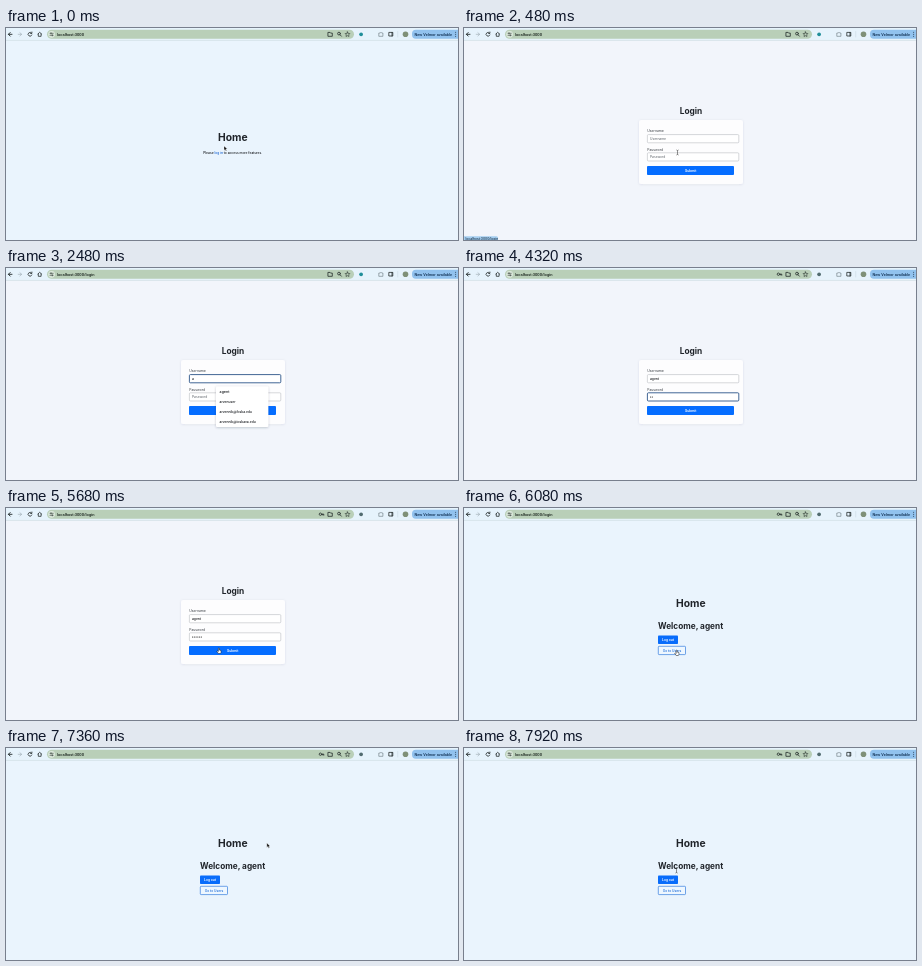
Animation, 452 px wide and 212 px high, one loop 8 s. Source, as an HTML page:

```html
<!DOCTYPE html>
<html lang="en">
<head>
<meta charset="utf-8">
<title>Login flow</title>
<style>
html, body { margin: 0; width: 100%; height: 100%; overflow: hidden; background: #eaf4fd; }
svg { display: block; width: 100vw; height: 100vh; }
text { font-family: Inter, "Open Sans", sans-serif; font-size: 3.3px; font-weight: 500; fill: #15181c; }
.bar text { font-family: Roboto, Inter, sans-serif; font-size: 4.05px; fill: #17211b; }
.h { font-weight: 700; fill: #20242a; }
.mid { text-anchor: middle; }
.label { font-size: 3.4px; font-weight: 400; fill: #3c4147; }
.hint { font-weight: 400; fill: #5c6269; }
.w { fill: #fff; font-weight: 600; }
.icon { fill: none; stroke: #1d2524; stroke-width: .75; stroke-linecap: round; stroke-linejoin: round; }
.field { fill: #fff; stroke: #b9bdc2; stroke-width: .6; }
.ring { fill: #fff; stroke: #123f7a; stroke-width: .8; }
.caret { stroke: #222; stroke-width: .4; }
</style>
</head>
<body>
<svg viewBox="0 0 452 212" preserveAspectRatio="none">
  <defs>
    <filter id="soft" x="-20%" y="-20%" width="140%" height="150%">
      <feDropShadow dx="0" dy=".6" stdDeviation=".9" flood-color="#26384d" flood-opacity=".3"/>
    </filter>
    <filter id="faint" x="-20%" y="-20%" width="140%" height="150%">
      <feDropShadow dx="0" dy=".5" stdDeviation="1.2" flood-color="#26384d" flood-opacity=".1"/>
    </filter>
    <clipPath id="round"><rect x="166" y="11.5" width="122" height="81.7" rx="3.2"/></clipPath>
  </defs>

  <rect id="back" width="452" height="212"/>

  <g id="home">
    <text id="homeTitle" class="h mid" x="226.8" style="font-size:10.3px">Home</text>
    <text id="intro" class="mid" x="226.7" y="126" style="font-size:3.25px">Please <tspan fill="#0d5bd0">log in</tspan> to access more features.</text>
    <g id="welcome">
      <text class="h" x="194" y="121.2" style="font-size:8.25px">Welcome, agent</text>
      <rect x="194" y="127.4" width="20" height="8.6" rx=".8" fill="#086cfb"/>
      <text class="w mid" x="204" y="132.9">Log out</text>
      <rect id="users" x="194.3" y="138.3" width="27.2" height="8.3" rx=".8" stroke="#1769d8" stroke-width=".6"/>
      <text id="usersText" class="mid" x="208" y="143.7"></text>
    </g>
  </g>

  <g id="login">
    <text class="h mid" x="227" y="86" style="font-size:8.35px">Login</text>
    <rect x="175" y="92" width="104" height="64" rx="2" fill="#fdfdfe" filter="url(#faint)"/>
    <text class="label" x="183.3" y="104">Username</text>
    <rect id="user" x="183.4" y="106.6" width="91.4" height="8.2" rx="1"/>
    <text id="userText" x="186" y="112"></text>
    <path id="userCaret" class="caret" d="M186 109v4"/>
    <text class="label" x="183.3" y="122.8">Password</text>
    <rect id="pass" x="183.4" y="124.8" width="91.4" height="8.2" rx="1"/>
    <text id="passHint" class="hint" x="186" y="130.2">Password</text>
    <g id="dots" fill="#222"></g>
    <path id="passCaret" class="caret" d="M186 127v4"/>
    <rect x="183" y="138" width="87" height="9" rx=".9" fill="#056dff"/>
    <text class="w mid" x="226.7" y="143.8" style="font-size:3.4px">Submit</text>
  </g>

  <g id="list">
    <rect id="listBox" x="210" y="118.5" width="52.3" height="40.5" rx="1.2" fill="#fff" filter="url(#soft)"/>
    <text x="213.6" y="125.2" style="font-size:3.6px">agent</text>
    <g id="more" style="font-size:3.5px">
      <text x="213.6" y="135">arvenuser</text>
      <text x="213.6" y="144.7">arvennik@foska.edu</text>
      <text x="213.6" y="154.5">arvennik@toskava.edu</text>
    </g>
  </g>

  <g class="bar">
    <rect width="452" height="12.3" fill="#e6f3fc"/>
    <path d="M0 12.4h452" stroke="#c9d9df" stroke-width=".6"/>
    <rect x="41" y="1.8" width="307" height="9" rx="4.5" fill="#b9cfb8"/>
    <circle cx="45.6" cy="6.3" r="3.4" fill="#dce9dc"/>
    <g class="icon">
      <path d="M6 6.3H2.5M4.2 4.5L2.4 6.3L4.2 8.1" stroke-width=".9"/>
      <path d="M12.2 6.3h3.4M13.9 4.7l1.7 1.6l-1.7 1.6" stroke="#a7b5bd"/>
      <path d="M25.6 5.2A1.9 1.9 0 1 0 25.8 7M25.9 4v1.4h-1.4"/>
      <path d="M31.9 6L33.7 4.3L35.5 6M32.3 5.8v2.5h2.8V5.8"/>
      <path d="M44 5.3h3.2M44 7.3h3.2M45 4.7v1.2M46.3 6.7v1.2" stroke-width=".55"/>
      <path id="key" d="M315.6 6.2a1.2 1.2 0 1 0-2.4 0a1.2 1.2 0 1 0 2.4 0h2.2v1M316.8 6.2v.8"/>
      <path d="M322.3 4.4h1.8l.5.7h1.7v3.2h-4z"/>
      <path d="M334.4 5.6a1.4 1.4 0 1 0-2.8 0a1.4 1.4 0 1 0 2.8 0M334 6.7l1.4 1.5"/>
      <path d="M341.5 3.9l.7 1.5l1.7.2l-1.2 1.2l.3 1.7l-1.5-.8l-1.5.8l.3-1.7l-1.2-1.2l1.7-.2z" stroke-width=".55"/>
      <path d="M373.2 5h1.1q.7-1.5 1.4 0h1.2v3.3h-3.7z" stroke="#66747b" stroke-width=".6"/>
      <rect x="383.2" y="4.4" width="3.6" height="3.6"/>
      <path d="M386 4.4v3.6"/>
      <path d="M391.7 3.5v5.5" stroke="#bfd0da" stroke-width=".4"/>
    </g>
    <circle id="badge" cx="355.1" cy="6.3" r="1.9"/>
    <circle cx="399.5" cy="6.2" r="2.8" fill="#7f9178"/>
    <path d="M410 1.8h42v9h-42a4 4 0 0 1-4-4v-1a4 4 0 0 1 4-4z" fill="#91c2ee"/>
    <text x="408.5" y="7.7" style="font-size:3.9px;fill:#102f52">New Velmor available</text>
    <g fill="#21394f"><circle cx="449.6" cy="4.3" r=".5"/><circle cx="449.6" cy="6.3" r=".5"/><circle cx="449.6" cy="8.3" r=".5"/></g>
    <text id="url" x="51" y="7.7"></text>
  </g>

  <g id="dialog">
    <rect x="166" y="11.5" width="122" height="81.7" rx="3.2" fill="#fff" stroke="#8f9aa6" stroke-width=".5" filter="url(#soft)"/>
    <g clip-path="url(#round)">
      <rect x="166" y="11" width="122" height="33.3" fill="#f4f5f6"/>
      <path d="M166 28q7-8 13 0t15-1q9-11 20-10h35" fill="none" stroke="#c9cdd2" stroke-width=".8"/>
      <circle cx="181" cy="27" r="4" fill="#e0e3e6"/>
      <path d="M238 36q8-1 12-10t18-14" fill="none" stroke="#c3c8cd" stroke-width=".8"/>
      <rect x="196.5" y="16" width="41" height="26" rx="1.5" fill="#fafbfc" stroke="#d5d9dd" stroke-width=".5"/>
      <rect x="210" y="25" width="18" height="9" rx="1" fill="#fff"/>
      <path d="M277 29h4.5" stroke="#c6cace" stroke-width="1"/>
    </g>
    <path d="M205.4 24.6L211.2 33.8h-11.6z" fill="#e23d32" stroke="#e23d32" stroke-width=".8" stroke-linejoin="round"/>
    <path d="M205.4 27.2v3.2M205.4 31.8v.7" stroke="#fff" stroke-width=".9"/>
    <g fill="#2f79dc"><circle cx="213.5" cy="30" r=".85"/><circle cx="216.7" cy="30" r=".85"/><circle cx="219.9" cy="30" r=".85"/><circle cx="223" cy="30" r=".85"/><rect x="224.6" y="27.4" width=".7" height="5"/></g>
    <text x="171.4" y="54.3" style="font-size:4.25px;font-weight:600">Change your password</text>
    <text x="171.4" y="64.2" style="font-size:3.2px">The password you just used was found in a data breach. Oskara</text>
    <text x="171.4" y="69.7" style="font-size:3.2px">Password Manager recommends changing your password now.</text>
    <path class="icon" d="M175.4 82.2a1.3 1.3 0 1 0-2.6 0a1.3 1.3 0 1 0 2.6 0M174.1 83.5v1.6h1" stroke-width=".5"/>
    <rect x="265" y="78" width="17" height="9.2" rx="4.6" fill="#0b50c4"/>
    <text class="w mid" x="273.5" y="83.8">OK</text>
  </g>

  <g id="status">
    <path d="M0 208.2h32.5a1.5 1.5 0 0 1 1.5 1.5v2.3H0z" fill="#a6cff1"/>
    <text id="statusText" x="1.5" y="211.7" style="font-size:3.3px;fill:#1c3347"></text>
  </g>

  <g id="cursor">
    <path id="arrow" d="M0 0v4.4l1.1-1l.8 1.7l.8-.4l-.8-1.6h1.4z" fill="#111" stroke="#fff" stroke-width=".35"/>
    <path id="beam" d="M-1.1 -2.5h.6l.5.5l.5-.5h.6M0 -2v4M-1.1 2.5h.6l.5-.5l.5.5h.6" fill="none" stroke="#222" stroke-width=".5"/>
    <path id="hand" d="M-.5 -.2q.5-.6 1 0v1.8l1.7.5v1.8l-.6 1.1h-2.1l-1.5-2.1l.5-.5l1 .6z" fill="#fff" stroke="#111" stroke-width=".5"/>
  </g>
</svg>
<script>
const LOOP = 8000;
const el = id => document.getElementById(id);
const within = (t, a, b) => t >= a && t < b;
const show = (id, on) => { el(id).style.display = on ? '' : 'none'; };
const attr = (id, key, value) => el(id).setAttribute(key, value);
const say = (id, value) => { if (el(id).textContent !== value) el(id).textContent = value; };

// time, x, y
const path = [
  [0, 218, 118], [80, 218, 118], [320, 212, 124.5], [480, 213.5, 124.5],
  [880, 214, 124], [1200, 210, 111], [1920, 210, 111], [2560, 210, 112],
  [2760, 219, 123], [3040, 219, 123], [3360, 212, 129], [5560, 212, 129],
  [5720, 213, 142.5], [6400, 212.5, 142.5], [6640, 212.5, 142.5],
  [7120, 273, 83], [7280, 273, 83], [7560, 213, 142.5], [7680, 213, 142],
  [7880, 212.5, 122.5], [8000, 212.5, 122.5]
];
const dotTimes = [4000, 4160, 4560, 4880, 5200, 5440];

const svgNS = 'http://www.w3.org/2000/svg';
const dots = dotTimes.map((_, i) => {
  const dot = document.createElementNS(svgNS, 'circle');
  dot.setAttribute('cx', 186.6 + i * 1.75);
  dot.setAttribute('cy', 129);
  dot.setAttribute('r', .6);
  el('dots').append(dot);
  return dot;
});

function position(t) {
  const i = Math.max(1, path.findIndex(p => p[0] > t));
  const [t0, x0, y0] = path[i - 1], [t1, x1, y1] = path[i];
  const k = (t - t0) / (t1 - t0), e = k * k * (3 - 2 * k);
  return [x0 + (x1 - x0) * e, y0 + (y1 - y0) * e];
}

function drawLogin(t) {
  const typed = t < 1920 ? '' : t < 2560 ? 'a' : t < 2800 ? 'ag' : 'agent';
  const count = dotTimes.filter(d => t >= d).length;
  attr('user', 'class', within(t, 1200, 3360) ? 'ring' : 'field');
  attr('pass', 'class', within(t, 3360, 5680) ? 'ring' : 'field');
  say('userText', typed || 'Username');
  attr('userText', 'class', typed ? '' : 'hint');
  show('userCaret', within(t, 1200, 1440));
  show('passHint', !count);
  show('passCaret', within(t, 3440, 4000));
  dots.forEach((dot, i) => dot.style.display = i < count ? '' : 'none');
  show('list', within(t, 1920, 2800));
  show('more', t < 2560);
  attr('listBox', 'height', t < 2560 ? 40.5 : 11);
}

function drawCursor(t, hover) {
  const [x, y] = position(t);
  const hand = hover || within(t, 240, 400) || within(t, 5640, 6160) || within(t, 7040, 7280);
  const beam = within(t, 400, 2560) || within(t, 3200, 3760) || t >= 7840;
  attr('cursor', 'transform', `translate(${x} ${y})`);
  show('cursor', !within(t, 1920, 2560) && !within(t, 3760, 5560));
  show('hand', hand);
  show('beam', beam && !hand);
  show('arrow', !hand && !beam);
}

function draw(t) {
  const login = within(t, 400, 5840), welcome = t >= 5840;
  const hover = within(t, 6160, 6680) || within(t, 7520, 7720);
  show('home', !login);
  show('login', login);
  show('intro', !welcome);
  show('welcome', welcome);
  attr('back', 'fill', login ? '#f2f5fb' : '#eaf4fd');
  attr('homeTitle', 'y', welcome ? 99.1 : 112.9);
  drawLogin(t);

  say('url', within(t, 960, 6160) ? 'localhost:3000/login' : 'localhost:3000');
  show('key', t >= 3040);
  attr('badge', 'fill', t < 3040 ? '#208f9a' : '#526c70');
  attr('users', 'fill', hover ? '#086cfb' : '#eef7ff');
  say('usersText', 'Go to Users');
  el('usersText').style.fill = hover ? '#fff' : '#1769d8';
  show('dialog', within(t, 6240, 7280));
  show('status', within(t, 200, 960) || hover);
  say('statusText', t < 1000 ? 'localhost:3000/login' : 'localhost:3000/users');
  drawCursor(t, hover);
}

const start = performance.now();
function tick() {
  draw((performance.now() - start) % LOOP);
  requestAnimationFrame(tick);
}
tick();
</script>
</body>
</html>
```
